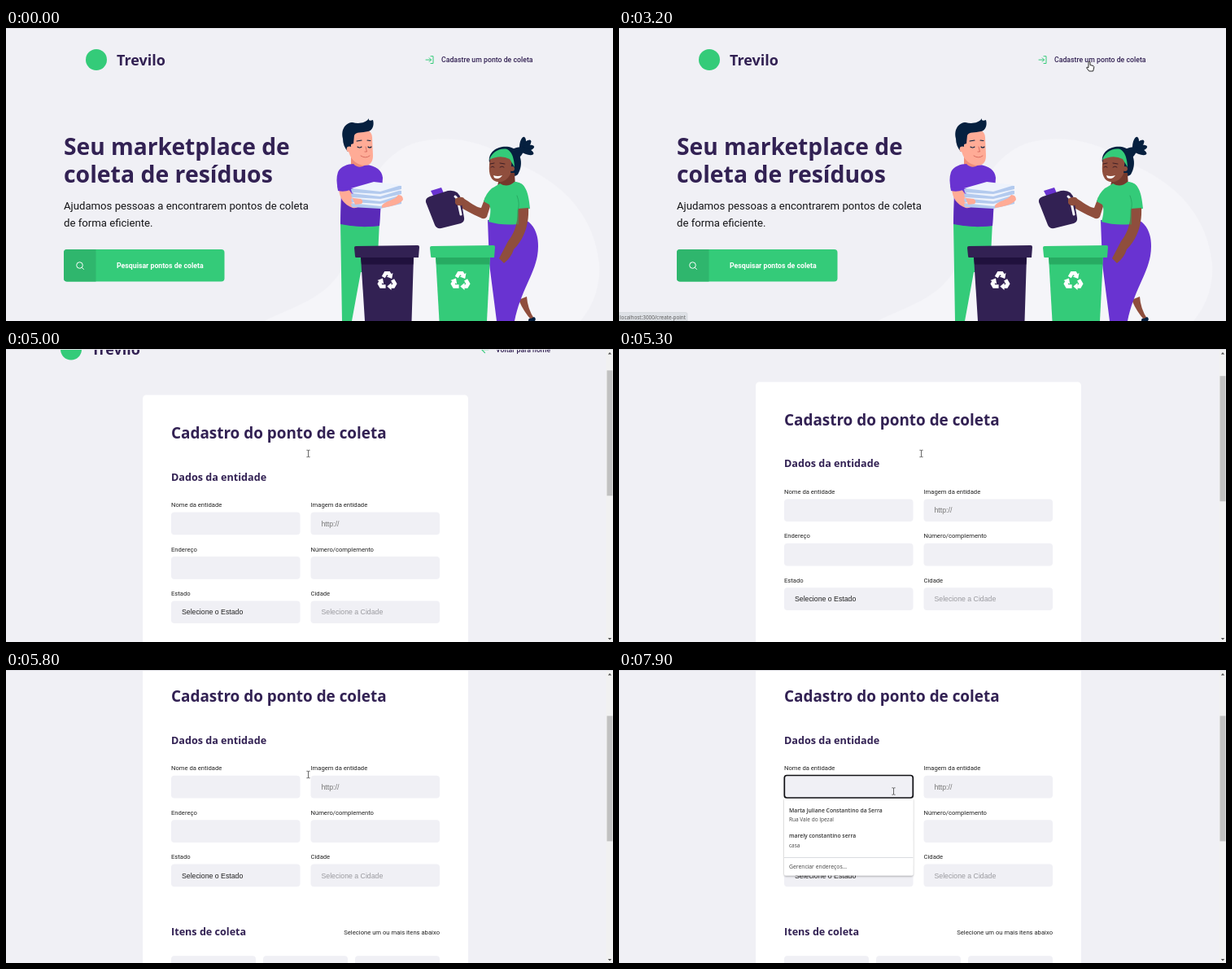
These frames come from a looping animation (746 by 360 pixels, 8000 ms). An HTML page:

```html
<!DOCTYPE html>
<html lang="pt-BR">
<head>
<meta charset="utf-8">
<title>Pontos de coleta</title>
<style>
html, body { margin: 0; width: 100%; height: 100%; overflow: hidden; background: #f0f0f5; }
svg { display: block; width: 746px; height: 360px; }
text { font-family: Roboto, sans-serif; fill: #222; white-space: pre; }
.head { font-family: "Open Sans", sans-serif; font-weight: 700; fill: #322153; }
.link { font-size: 8.74px; font-weight: 500; fill: #322153; }
.lead { font-size: 13.16px; fill: #151518; }
.label { font-size: 7.65px; }
.field { font-family: "Liberation Sans", Arial, sans-serif; font-size: 8.74px; }
.ui { font-family: "Open Sans", sans-serif; font-size: 6.5px; fill: #444; }
.strong { font-size: 6.8px; font-weight: 600; fill: #333; }
.line { fill: none; stroke-linecap: round; stroke-linejoin: round; }
</style>
</head>
<body>
<svg viewBox="0 0 746 360" xmlns="http://www.w3.org/2000/svg">
<defs>
  <filter id="shade" x="-10%" y="-10%" width="120%" height="125%">
    <feDropShadow dx="0" dy="1" stdDeviation="1.2" flood-color="#000" flood-opacity=".35"/>
  </filter>
  <g id="turn">
    <path d="M-4.700-4.900L-1.850-9.800H1.850L3.300-7.300" fill="none" stroke="#fff" stroke-width="4.600"/>
    <path d="M7-9.900L5.700-3.100-.8-5.400Z" fill="#fff"/>
  </g>
  <g id="recycle">
    <use href="#turn"/>
    <use href="#turn" transform="rotate(120)"/>
    <use href="#turn" transform="rotate(240)"/>
  </g>
  <g id="brand">
    <circle cx="13" cy="39" r="13" fill="#34cb79"/>
    <text class="head" x="38" y="45.500" font-size="18">Trevilo</text>
  </g>
</defs>
<rect width="746" height="360" fill="#f0f0f5"/>

<g id="home">
  <path d="M318 360C350 343 398 332 416 290C430 240 440 165 500 142C540 129 590 138 625 165C680 188 722 225 729 290C731 325 716 348 706 360Z" fill="#f5f5f9"/>
  <use href="#brand" x="98"/>
  <path class="line" d="M522 34.700H525V43.500H522M516 39.100H522.500M520.200 36.800L522.500 39.100 520.200 41.400" stroke="#34cb79"/>
  <text class="link" x="535" y="42">Cadastre um ponto de coleta</text>
  <text class="head" x="71" y="155.500" font-size="28.2">Seu marketplace de</text>
  <text class="head" x="71" y="189.500" font-size="28.4">coleta de resíduos</text>
  <text class="lead" x="71" y="223">Ajudamos pessoas a encontrarem pontos de coleta</text>
  <text class="lead" x="71" y="244">de forma eficiente.</text>
  <rect x="71" y="272" width="197.500" height="39.500" rx="4" fill="#34cb79"/>
  <path d="M75 272H110.500V311.500H75Q71 311.500 71 307.500V276Q71 272 75 272Z" fill="#2fb66d"/>
  <path class="line" d="M93.700 294.700L95.400 296.400" stroke="#fff"/>
  <circle cx="90.500" cy="291.500" r="3.800" fill="none" stroke="#fff"/>
  <text class="link" x="136" y="295" style="fill:#fff;font-weight:700">Pesquisar pontos de coleta</text>

  <!-- man -->
  <path d="M411 238H459L456 300H436L425 360H413Z" fill="#34cb79"/>
  <path d="M424 155H442V172Q432 178 424 170Z" fill="#ef8d78"/>
  <path d="M408 177C411 170 420 167 427 167Q434 174 442 168C455 169 462 175 463 184L459 243Q434 246 411 240L412 198L408 198Q405 186 408 177Z" fill="#6933d1"/>
  <path d="M412 212L411 241Q434 246 459 243L460 218Z" fill="#5a2ab8"/>
  <path d="M421 130C424 121 449 120 450 134L451 157C451 166 446 169 440 169C430 168 422 160 421 150Z" fill="#ffab96"/>
  <path d="M414 136C411 124 418 116 426 116C433 118 442 117 446 111Q445 115 451 113C453 120 450 126 445 127C437 129 430 127 428 132L427 142 424 143 424 150 420 152C416 147 414 142 414 136Z" fill="#06203f"/>
  <circle cx="422" cy="149" r="3.400" fill="#ffab96"/>
  <path class="line" d="M432 146Q434.500 148 437 146M445 146Q447 148 449 146M431 139L437 138M444 138L448 138.500" stroke="#06203f" stroke-width="1.100"/>
  <path class="line" d="M442 146L443.500 152H441M436 157Q442 161 447 157" stroke="#cf5f55" stroke-width=".8"/>
  <path d="M409 198H421L428 208L437 215Q434 222 426 221C415 217 410 209 409 198Z" fill="#ffab96"/>
  <path d="M407 193Q414 199 423 196V199Q415 202 408 200Z" fill="#6933d1"/>
  <g id="papers"></g>
  <path d="M462 218C466 212 478 212 482 205Q488 205 488 211C484 217 474 219 462 221Z" fill="#ffab96"/>
  <path d="M426 209L436 210Q440 213 437 216L429 217Z" fill="#ffab96"/>

  <!-- woman -->
  <g id="bun" fill="#06203f"></g>
  <path d="M594 165C592 151 606 144 618 146C633 149 637 167 629 180Q622 186 616 174Z" fill="#06203f"/>
  <path d="M607 178H625L626 196Q614 202 604 195Z" fill="#74392c"/>
  <path d="M595 160C593 172 593 182 599 187C607 192 616 188 620 179L622 160C614 152 603 153 595 160Z" fill="#8f4e3d"/>
  <path d="M594 162C597 153 606 147 616 149Q624 153 625 171L619 161Q607 155 594 162Z" fill="#34cb79"/>
  <path class="line" d="M596 171Q598 169 600 171M607 171Q610 169 612 171M595 167L600 166M607 166L613 167" stroke="#2a1420" stroke-width=".8"/>
  <path d="M599 181Q604 183 610 181Q606 187 600 184Z" fill="#fff"/>
  <circle cx="622" cy="173" r="3" fill="#8f4e3d"/>
  <path d="M630 334L640 330Q641 345 649 357L646 359Q637 350 630 334Z" fill="#8f4e3d"/>
  <path d="M642 360Q642 356 645 357L649 355Q652 357 650 360Z" fill="#06203f"/>
  <path d="M592 236L632 234C649 237 657 255 653 280C649 303 632 325 625 360H603L594 290Z" fill="#6933d1"/>
  <path d="M597 213L591 232Q588 236 583 233C573 229 562 222 554 218L553 211 562 209C570 214 577 220 584 221L589 208Z" fill="#8f4e3d"/>
  <path d="M597 197Q604 193 607 191Q616 197 625 189C636 189 642 197 644 222L630 224L629 241Q610 243 593 238C596 228 596 222 594 217L587 213Q590 203 597 197Z" fill="#34cb79"/>
  <path d="M629 222L642 221C643 241 637 259 624 272Q621 282 612 289L606 283L617 262C627 249 629 237 629 222Z" fill="#8f4e3d"/>
  <path d="M628 206Q632 216 629 224L629 241" class="line" stroke="#28aa63"/>

  <!-- jug -->
  <path d="M522 200L535 196L538 203L526 208Z" fill="#6933d1"/>
  <path d="M516 214Q515 209 521 207L543 200Q556 198 559 210L563 233Q564 238 559 240L535 246Q529 247 527 242Z" fill="#322153"/>
  <path class="line" d="M552 207Q555 209 556 215L559 229" stroke="#f7f7fa" stroke-width="3"/>
  <path d="M552 210Q558 206 563 209L560 213Q565 215 560 218Q554 219 552 215Z" fill="#8f4e3d"/>

  <!-- bins -->
  <path d="M436 281H501L498.500 360H441Z" fill="#322153"/>
  <path d="M436 282H501L500.500 290.500H437Z" fill="#20113d"/>
  <path d="M430 268L506 267Q508 267 508 269L507 282H430Q429 282 429 280L428 270Q428 268 430 268Z" fill="#322153"/>
  <path d="M528 281H595L591 360H532.500Z" fill="#34cb79"/>
  <path d="M528 282H594.500L594 290.500H529Z" fill="#27ab62"/>
  <path d="M523 268L599 267Q601 267 601 269L600 282H523Q522 282 522 280L521 270Q521 268 523 268Z" fill="#34cb79"/>
  <use href="#recycle" x="468.500" y="311"/>
  <use href="#recycle" x="558.500" y="311"/>
</g>

<g id="form">
  <g id="page">
    <use href="#brand" x="67"/>
    <path class="line" d="M593 39H584.500M588.500 35L584.500 39 588.500 43" stroke="#34cb79" stroke-width="1.100"/>
    <text class="link" x="602" y="42">Voltar para home</text>
    <rect x="168" y="95" width="400" height="700" rx="4.400" fill="#fff"/>
    <text class="head" x="203" y="148.600" font-size="18.9">Cadastro do ponto de coleta</text>
    <text class="head" x="203" y="200" font-size="12.6">Dados da entidade</text>
    <g id="fields"></g>
    <text class="head" x="203" y="435.500" font-size="12.6">Itens de coleta</text>
    <text class="label" x="533" y="434" text-anchor="end">Selecione um ou mais itens abaixo</text>
  </g>
  <rect id="focus" x="203.300" y="129.500" width="158" height="27.500" rx="3" fill="none" stroke="#101014" stroke-width="1.700"/>
  <g id="list">
    <path d="M203 158H361.500V250.500Q361.500 252.500 359.500 252.500H205Q203 252.500 203 250.500Z" fill="#fff" filter="url(#shade)"/>
    <text class="ui strong" x="209" y="174.500">Marta Juliane Constantino da Serra</text>
    <text class="ui" x="209" y="186">Rua Vale do Ipezal</text>
    <text class="ui strong" x="209" y="206">marely constantino serra</text>
    <text class="ui" x="209" y="218">casa</text>
    <path d="M203 230.500H361.500" stroke="#dadce0"/>
    <text class="ui" x="209" y="244" style="font-size:6.8px">Gerenciar endereços...</text>
  </g>
  <rect x="737.500" width="8.500" height="360" fill="#f1f1f1"/>
  <path d="M739.800 6.500L742 4 744.200 6.500ZM739.800 355L742 357.500 744.200 355Z" fill="#505050"/>
  <rect id="thumb" x="738.500" y="10" width="7" height="154" fill="#c1c1c1"/>
</g>

<rect width="746" height="1" fill="#dfdfe5"/>
<g id="status">
  <path d="M0 349.500H82Q84 349.500 84 351.500V360H0Z" fill="#dee1e6" stroke="#cbced3" stroke-width=".5"/>
  <text class="ui" x="1" y="357.500" style="font-size:6.35px;fill:#555">localhost:3000/create-point</text>
</g>
<g id="cursor">
  <path id="arrow" d="M0 0V9.500L2.200 7.500 3.800 10.800 5.200 10.200 3.700 7H6.700Z" fill="#fff" stroke="#111" stroke-width=".8"/>
  <path id="hand" d="M-1 1C-1-.2 1-.2 1 1V4.500L5 5.500Q6 6 5.700 8L4.600 12H-.3L-3.300 8Q-3.500 6.300-1 7.600Z" fill="#fff" stroke="#111" stroke-width=".9"/>
  <path id="beam" class="line" d="M-1.700-4.200H-.6L0-3.700 .6-4.200H1.700M0-3.700V3.700M-1.700 4.200H-.6L0 3.700 .6 4.200H1.700" stroke="#444" stroke-width=".8"/>
</g>
</svg>
<script>
const $ = id => document.getElementById(id);
const LOOP = 8000, TICK = 100, WHEEL = 54.6;

// time, x, y, shape
const moves = [
  [1600, 220, 345, 'arrow'], [1700, 245, 285, 'hand'], [1800, 309, 170, 'beam'],
  [2000, 400, 125, 'arrow'], [2300, 510, 85, 'arrow'], [2500, 564, 57, 'arrow'],
  [2700, 573, 46, 'hand'], [2900, 578, 41, 'hand'], [3600, 578, 41, 'hand'],
  [3700, 540, 56, 'arrow'], [4100, 428, 275, 'arrow'], [4400, 428, 275, 'arrow'],
  [4600, 371.5, 128.5, 'beam'], [6400, 371.5, 128.5, 'beam'],
  [6700, 352, 140, 'beam'], [7100, 337.5, 149, 'beam']
];

function build() {
  const sheet = i => {
    const y = 216 - i * 6;
    return `<path d="M424 ${y}L452 ${y - 7} 486 ${y - 4}V${y}L460 ${y + 6} 425 ${y + 4}Z" fill="#b3caee"/>` +
      `<path d="M424 ${y - 1}L452 ${y - 9} 486 ${y - 5} 460 ${y + 3}Z" fill="#eef3fc"/>`;
  };
  $('papers').innerHTML = [0, 1, 2, 3].map(sheet).join('');

  $('bun').innerHTML = [-80, -45, -12, 22, 125, 165].map(a =>
    `<ellipse cx="6" rx="9.500" ry="3.800" transform="translate(634 149) rotate(${a})"/>`).join('');

  const field = (x, y, label, text = '', color = '#757575') =>
    `<text class="label" x="${x}" y="${y - 6.3}">${label}</text>` +
    `<rect x="${x}" y="${y}" width="158.500" height="27.700" rx="4" fill="#f0f0f5"/>` +
    `<text class="field" x="${x + 13}" y="${y + 17}" style="fill:${color}">${text}</text>`;
  const left = 203, right = 374.5, row = i => 239 + i * 54.4;
  $('fields').innerHTML =
    field(left, row(0), 'Nome da entidade') +
    field(right, row(0), 'Imagem da entidade', 'http://') +
    field(left, row(1), 'Endereço') +
    field(right, row(1), 'Número/complemento') +
    field(left, row(2), 'Estado', 'Selecione o Estado', '#222') +
    field(right, row(2), 'Cidade', 'Selecione a Cidade', '#9a9a9f') +
    [0, 1, 2].map(i => `<rect x="${left + i * 113}" y="460.500" width="104" height="98" rx="4" fill="#f0f0f5"/>`).join('');
}

const show = (id, on) => $(id).setAttribute('visibility', on ? 'inherit' : 'hidden');
const ease = p => 1 - (1 - Math.min(1, Math.max(0, p))) ** 3;

function pointer(t) {
  const i = moves.findLastIndex(m => m[0] <= t);
  const [t0, x0, y0, shape] = moves[Math.max(i, 0)];
  const [t1, x1, y1] = moves[i + 1] || [t0 + 1, x0, y0];
  const p = (t - t0) / (t1 - t0);
  $('cursor').setAttribute('visibility', i < 0 ? 'hidden' : 'visible');
  $('cursor').setAttribute('transform', `translate(${x0 + (x1 - x0) * p} ${y0 + (y1 - y0) * p})`);
  for (const s of ['arrow', 'hand', 'beam']) $(s).setAttribute('display', s === shape ? 'inline' : 'none');
}

function render(ms) {
  const t = Math.floor(ms % LOOP / TICK) * TICK;
  const scroll = WHEEL * (ease((t - 4900) / 300) + ease((t - 5500) / 300));
  show('home', t < 3700);
  $('form').setAttribute('display', t < 3700 ? 'none' : 'inline');
  $('page').setAttribute('transform', `translate(0 ${-scroll})`);
  $('thumb').setAttribute('y', 10 + scroll * 0.425);
  show('focus', t >= 7300);
  show('list', t >= 7400);
  show('status', t >= 3100 && t < 4000);
  $('status').setAttribute('opacity', t < 3200 ? 0.6 : 1);
  pointer(t);
}

build();
const start = performance.now();
function frame() {
  render(performance.now() - start);
  requestAnimationFrame(frame);
}
frame();
</script>
</body>
</html>
```
